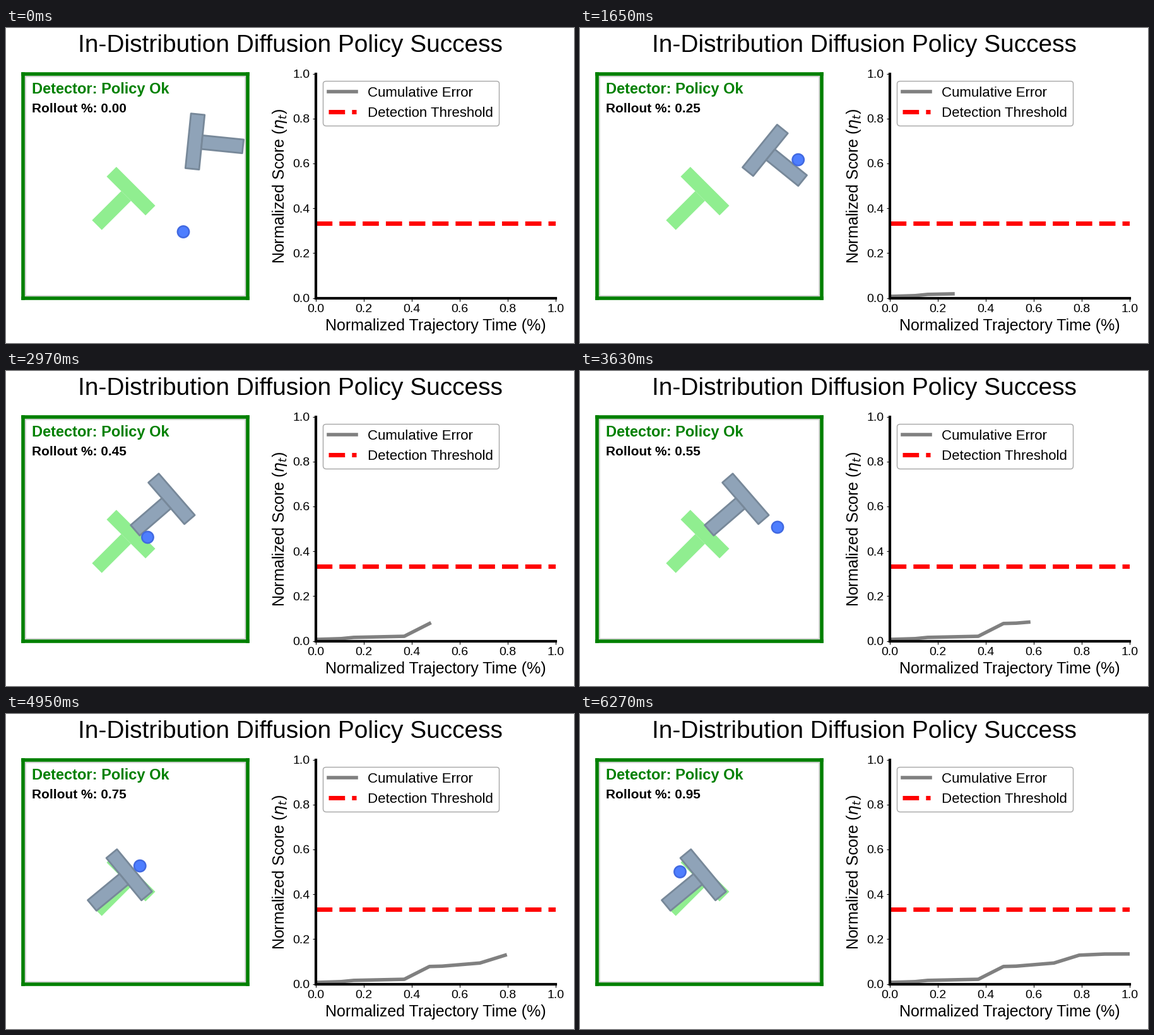
Recreate the animation shown at these times as a matplotlib script. Size 900x500 px, loop 8.6 s.

```python
import numpy as np
import matplotlib.pyplot as plt
from matplotlib.animation import FuncAnimation
from matplotlib.patches import Circle, Polygon, Rectangle

plt.rcParams["font.family"] = "Liberation Sans"

W, H, DPI = 900, 500, 100
LOOP, TICK = 8600, 40          # ms
STEP, LAST = 330, 19           # ms per rollout step, final step
TOP, BOTTOM = 72.55, 428.55    # vertical extent of both axes
PX = 72 / DPI                  # points per pixel
SCALE = 356 / 512              # pixels per simulator unit
UNIT = 21.8                    # thickness of the T block in pixels
RADIUS = 10.4                  # agent

# Block: step, x and y of the bar's outer edge, direction of the stem
BLOCK_KEYS = [
    (4, 288.7, 179.1, 5.8), (5, 284.9, 187.3, 39), (7, 271.2, 195.4, 106.2),
    (9, 270.6, 195.8, 139.1), (11, 270.6, 195.8, 139.1),
    (13, 247.5, 216.2, 143.5), (15, 203.6, 248.3, 140.4),
]
# Agent while it moves freely: step, x, y
AGENT_KEYS = [
    (0, 281, 323.5), (2, 258, 178), (3, 300, 109.5), (4, 345, 150),
    (10, 258, 282), (11, 313, 248),
    (16, 157.5, 205), (17, 136.5, 236), (19, 158.5, 250.5),
]
# Error: the steps at which its growth changes
ERROR_KEYS = [
    (0, .007), (2, .0105), (3, .016), (7, .021), (9, .078), (10, .0795),
    (13, .0935), (15, .1285), (17, .1335), (19, .134),
]


def at(keys, step):
    """Values of a keyframe list at a step, linear between the keys."""
    steps, *columns = zip(*keys)
    return np.array([np.interp(step, steps, col) for col in columns])


def place(pose, side, along):
    """Stage position of a point given in the block's own frame."""
    x, y, angle = pose
    a = np.radians(angle)
    return (x + along * np.cos(a) + side * np.sin(a),
            y + along * np.sin(a) - side * np.cos(a))


def tee(pose):
    """Corner points of the bar and the stem."""
    def box(half, near, far):
        corners = [(-half, near), (half, near), (half, far), (-half, far)]
        return [place(pose, UNIT * u, UNIT * v) for u, v in corners]

    return box(2, 0, 1), box(.5, 1, 4)


def agent_at(step):
    pose = at(BLOCK_KEYS, step)
    if 5 <= step <= 9:         # pushes the side of the stem
        slide = min((step - 5) / 2, 1)
        return place(pose, UNIT / 2 + RADIUS, 61 + 18.5 * slide)
    if 12 <= step <= 15:       # pushes the back of the bar
        return place(pose, 0, -RADIUS - .8)
    return tuple(at(AGENT_KEYS, step))


def add_axes(x0, x1):
    return fig.add_axes([x0 / W, 1 - BOTTOM / H,
                         (x1 - x0) / W, (BOTTOM - TOP) / H])


fig = plt.figure(figsize=(W / DPI, H / DPI), dpi=DPI, facecolor="white")
fig.suptitle("In-Distribution Diffusion Policy Success", fontsize=28)

# Simulator view, in stage pixels
sim = add_axes(27, 383)
sim.set(xlim=(27, 383), ylim=(BOTTOM, TOP), xticks=[], yticks=[])
for spine in sim.spines.values():
    spine.set(color="green", linewidth=4)

inset, side = 5 * SCALE, 501 * SCALE
sim.add_patch(Rectangle((27 + inset, 73 + inset), side, side, fill=False,
                        ec="lightgray", lw=4 * SCALE * PX))
for pts in tee((205.7, 251.2, 135)):
    sim.add_patch(Polygon(pts, fc="lightgreen", ec="none"))

block = [sim.add_patch(Polygon(pts, fc="#8fa3b8", ec="lightslategray",
                               lw=4 * SCALE * PX, joinstyle="round",
                               zorder=2))
         for pts in tee(at(BLOCK_KEYS, 0))]
agent = [sim.add_patch(Circle((0, 0), r, fc=color, ec="none", zorder=3))
         for r, color in ((RADIUS, "royalblue"), (RADIUS - 2.5, "#4e7eff"))]

sim.text(41, 104, "Detector: Policy Ok", color="green", fontsize=17,
         weight="bold")
rollout = sim.text(41, 134, "", fontsize=15, weight="bold")

# Score chart
chart = add_axes(491, 871)
chart.set(xlim=(0, 1), ylim=(0, 1))
chart.spines[["top", "right"]].set_visible(False)
chart.spines[["left", "bottom"]].set_linewidth(3)
chart.tick_params(labelsize=14)
chart.set_xlabel("Normalized Trajectory Time (%)", fontsize=18)
chart.set_ylabel(r"Normalized Score ($\eta_t$)", fontsize=18)
curve, = chart.plot([], [], color="gray", lw=4, label="Cumulative Error")
chart.axhline(.333, color="red", lw=5, ls="--", label="Detection Threshold")
chart.legend(loc="upper left", fontsize=16, framealpha=1, edgecolor="0.65")


def update(i):
    step = min((i * TICK + TICK - 10) // STEP, LAST)
    for part, pts in zip(block, tee(at(BLOCK_KEYS, step))):
        part.set_xy(pts)
    for disc in agent:
        disc.center = agent_at(step)
    rollout.set_text(f"Rollout %: {step * .05:.2f}")
    # A single point leaves no mark
    steps = np.arange(step + 1 if step else 0)
    curve.set_data(steps / LAST, at(ERROR_KEYS, steps)[0])
    return [*block, *agent, rollout, curve]


anim = FuncAnimation(fig, update, frames=LOOP // TICK, interval=TICK,
                     repeat=True, repeat_delay=0)
plt.show()
```
